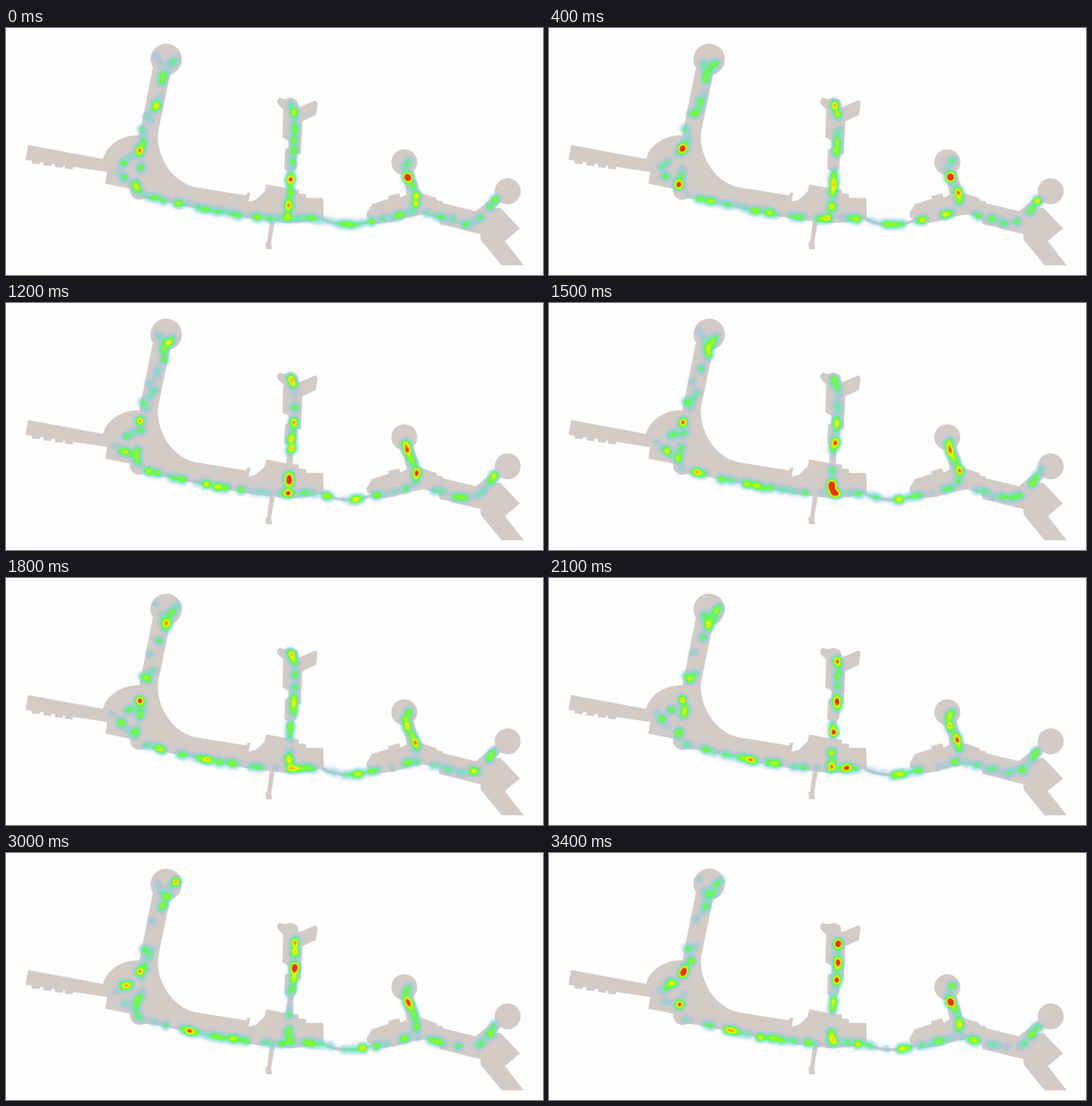
Recreate the animation shown at these times as a matplotlib script. Size 600 by 276 pixels, loop 3.5 s.

```python
import numpy as np
import matplotlib.pyplot as plt
from matplotlib.animation import FuncAnimation
from matplotlib.colors import LinearSegmentedColormap
from matplotlib.patches import Circle, PathPatch, Polygon
from matplotlib.path import Path

W, H, DPI = 600, 276, 100
FRAMES, STEP_MS = 35, 100
FLOOR, PAPER = "#d3cbc5", "#fefefe"
SIGMA = 3.5
rng = np.random.default_rng(12)

fig = plt.figure(figsize=(W / DPI, H / DPI), dpi=DPI, facecolor=PAPER)
ax = fig.add_axes([0, 0, 1, 1])
ax.set(xlim=(0, W), ylim=(H, 0))
ax.axis("off")


# Floor plan
def slab(*pts):
    ax.add_patch(Polygon(pts, fc=FLOOR, ec=FLOOR, lw=0.3))


def disc(x, y, r):
    ax.add_patch(Circle((x, y), r, fc=FLOOR, ec="none"))


def west_hall():
    M, L, C = Path.MOVETO, Path.LINETO, Path.CURVE4
    steps = [
        (M, (164, 45)), (L, (149, 120)),
        (C, (130, 119)), (C, (111, 131)), (C, (108, 148)),
        (L, (113, 161)), (L, (111, 174)), (L, (141, 180)),
        (L, (150, 190)), (L, (166, 192)), (L, (237, 207)),
        (L, (283, 215)), (L, (291, 181)), (L, (279, 192)),
        (L, (271, 194)), (L, (273, 184)), (L, (270, 184)),
        (L, (268, 187)), (L, (212, 178)),
        (C, (186, 173)), (C, (167, 143)), (C, (170, 116)),
        (L, (184, 48)), (L, (164, 45)),
    ]
    codes, pts = zip(*steps)
    ax.add_patch(PathPatch(Path(pts, codes), fc=FLOOR, ec="none"))


def west_arm():
    slab((25, 131), (111, 147), (115, 161), (22, 147))
    for x in (29, 42, 55, 66):
        y = 147 + 0.155 * (x - 22)
        slab((x, y), (x + 9, y + 1), (x + 8, y + 4), (x, y + 3))


west_hall()
west_arm()
disc(179, 35, 17.5)
disc(149, 181.5, 10.5)
slab((291, 175), (312, 179), (327, 181), (327, 185), (335, 186), (335, 190),
     (354, 190), (355, 212), (340, 216), (316, 218), (280, 214), (283, 198),
     (289, 183))
slab((295, 216), (300, 217), (296, 240), (297, 247), (291, 247), (290, 240),
     (292, 239))
slab((303, 81), (306, 78), (311, 80), (318, 78), (325, 81), (327, 89),
     (346, 81), (348, 84), (346, 97), (331, 104), (329, 141), (325, 140),
     (324, 157), (321, 160), (320, 182), (313, 182), (315, 160), (311, 157),
     (312, 136), (316, 134), (316, 126), (309, 122), (310, 91), (304, 85))
slab((403, 207), (409, 197), (428, 191), (427, 188), (439, 185), (441, 190),
     (448, 186), (443, 162), (455, 160), (462, 184), (480, 190), (482, 193),
     (488, 194), (488, 196), (525, 205), (548, 186), (554, 193), (545, 202),
     (552, 201), (574, 224), (557, 238), (578, 265), (554, 265), (531, 237),
     (530, 230), (521, 228), (498, 222), (485, 219), (483, 213), (467, 208),
     (450, 211), (434, 216), (410, 219), (411, 214), (404, 212))
disc(445, 150, 14.5)
disc(560.5, 182.5, 14.5)
bridge = Path([(350, 211), (366, 222), (395, 223), (412, 213)],
              [Path.MOVETO] + [Path.CURVE4] * 3)
ax.add_patch(PathPatch(bridge, fc="none", ec=FLOOR, lw=2.4))


# People
class Route:
    """Walkers spread along a polyline, each drifting at its own pace."""

    def __init__(self, pts, people, heat, spread, pace=14):
        self.pts = np.array(pts, float)
        hops = np.hypot(*np.diff(self.pts, axis=0).T)
        self.dist = np.r_[0, np.cumsum(hops)]
        self.length = self.dist[-1]
        slots = np.arange(people) + rng.normal(0.5, 0.7, people)
        self.start = slots / people * self.length
        self.speed = rng.normal(0, pace, people)
        self.side = rng.normal(0, spread, (people, 2))
        self.heat = heat * rng.uniform(0.6, 1.4, people)

    def at(self, t):
        s = (self.start + self.speed * t) % self.length
        x = np.interp(s, self.dist, self.pts[:, 0]) + self.side[:, 0]
        y = np.interp(s, self.dist, self.pts[:, 1]) + self.side[:, 1]
        return np.column_stack([x, y, self.heat])


class Queue:
    """A busy spot that sways up and down and swells in waves."""

    def __init__(self, x, y, heat, swell, sway):
        self.x, self.y, self.heat = x, y, heat
        self.swell, self.sway = swell, sway
        self.phase = rng.uniform(0, 2 * np.pi, 2)

    def at(self, t):
        a, b = np.sin(np.array([2, 3]) * 2 * np.pi * t / 3.5 + self.phase)
        return np.array([[self.x, self.y + self.sway * a,
                          self.heat + self.swell * b]])


places = [
    # west pier, dome and its two lower passages
    Route([(191, 29), (180, 44), (171, 66), (160, 106), (151, 130)],
          19, .25, 2.6),
    Route([(168, 28), (174, 45)], 2, .25, 1),
    Route([(151, 132), (153, 150), (147, 168), (149, 183)], 8, .22, 1.8),
    Route([(146, 142), (122, 155), (128, 166), (145, 176)], 9, .23, 1.8),
    # concourse, bridge and east wing
    Route([(149, 185), (185, 194.5), (240, 206), (270, 210), (300, 213),
           (340, 212), (362, 216), (385, 220), (405, 217), (430, 212),
           (457, 204)], 62, .2, .7),
    Route([(457, 204), (480, 209), (512, 218), (528, 214), (537, 207),
           (552, 184)], 19, .22, 1.2),
    # central and east piers
    Route([(318, 83), (324, 98), (322, 120), (322, 135), (319, 160),
           (316, 185), (315, 210)], 31, .23, 1.2),
    Route([(451, 147), (446, 157), (448, 166), (455, 178), (459, 189),
           (457, 202)], 14, .23, .9, 8),
    Queue(149, 134, .75, .1, 2.5),
    Queue(144, 175, .25, .25, 2),
    Queue(318, 163, .45, .2, 11),
    Queue(315, 199, .25, .15, 5),
    Queue(334, 212, .25, .1, 0),
    Queue(448, 167, .35, .2, 1.5),
    Queue(457, 196, .2, .1, 5),
]

# Heat layer
RAMP = [(0, (150, 205, 250), 0), (.05, (150, 205, 245), .1),
        (.11, (140, 192, 228), .34), (.2, (125, 212, 220), .58),
        (.3, (95, 236, 175), .78), (.41, (90, 250, 80), .92),
        (.58, (140, 255, 30), .97), (.74, (250, 250, 0), 1),
        (.87, (255, 150, 0), 1), (1, (240, 50, 20), 1)]
heat_map = LinearSegmentedColormap.from_list(
    "heat", [(v, (*np.array(rgb) / 255, a)) for v, rgb, a in RAMP], N=512)

layer = ax.imshow(np.zeros((H, W)), cmap=heat_map, vmin=0, vmax=1,
                  extent=(0, W, H, 0), interpolation="nearest",
                  aspect="auto", zorder=5)
cols, rows = np.arange(W) + .5, np.arange(H) + .5


def bell(grid, centres):
    return np.exp(-(grid - centres[:, None]) ** 2 / (2 * SIGMA ** 2))


def draw(i):
    t = i * STEP_MS / 1000
    x, y, heat = np.vstack([p.at(t) for p in places]).T
    field = (bell(rows, y) * heat[:, None]).T @ bell(cols, x)
    layer.set_data(np.clip(field, 0, 1))
    return [layer]


anim = FuncAnimation(fig, draw, frames=FRAMES, interval=STEP_MS,
                     repeat=True, repeat_delay=0)
plt.show()
```
